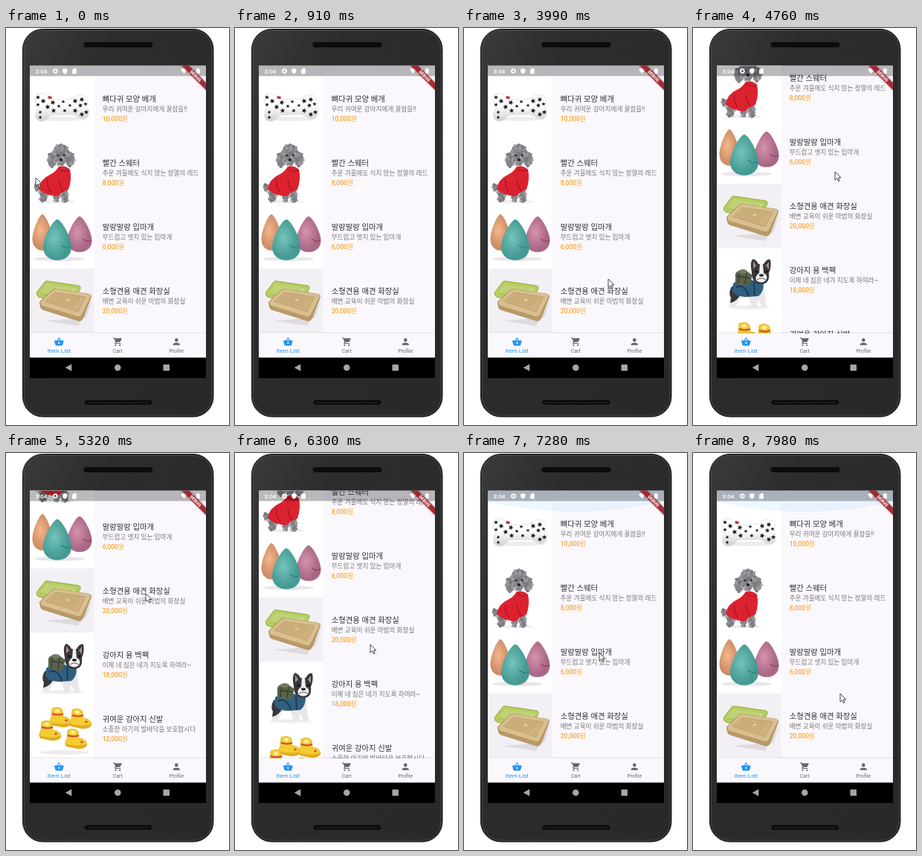
An HTML page for the animation above (8 s loop, 300x533 px).

```html
<!DOCTYPE html>
<html lang="ko">
<head>
<meta charset="utf-8">
<title>Item list</title>
<style>
  html, body { margin: 0; width: 100%; height: 100%; overflow: hidden; background: #fff; }
  svg { display: block; width: 300px; height: 533px; }
  text { font-family: Roboto, "Noto Sans CJK KR", "Noto Sans CJK", sans-serif; }
  .title { font-size: 10.4px; fill: #303032; }
  .note { font-size: 8.65px; fill: #78777b; }
  .price { font-size: 8.65px; fill: #f7a52d; font-weight: 500; }
  .tab { font-size: 6.9px; fill: #6b6a6d; text-anchor: middle; }
  .tab.on { font-size: 8.07px; fill: #2196f3; }
</style>
</head>
<body>
<svg viewBox="0 0 300 533" xmlns="http://www.w3.org/2000/svg">
  <defs>
    <clipPath id="screen"><rect x="32" y="50.500" width="237" height="419.500"/></clipPath>
    <clipPath id="view"><rect x="32" y="50.500" width="237" height="359.500"/></clipPath>
    <clipPath id="tile"><rect width="86.500" height="86"/></clipPath>
    <linearGradient id="body" x2="1" y2="1">
      <stop stop-color="#3b3b3c"/><stop offset=".25" stop-color="#2c2c2d"/><stop offset="1" stop-color="#292929"/>
    </linearGradient>
    <linearGradient id="cloth" x2="0" y2="1"><stop offset=".45" stop-color="#fff"/><stop offset="1" stop-color="#cfcdd0"/></linearGradient>
    <radialGradient id="shade" cx=".4" cy=".45"><stop stop-color="#fff" stop-opacity=".22"/><stop offset="1" stop-color="#203040" stop-opacity=".2"/></radialGradient>
    <filter id="soft" x="-50%" y="-50%" width="200%" height="200%"><feGaussianBlur stdDeviation="1.500"/></filter>
  </defs>

  <!-- phone -->
  <rect x="22.500" y="1.500" width="256.500" height="520.500" rx="27" fill="url(#body)" stroke="#161616"/>
  <rect x="24.500" y="3.500" width="252.500" height="516.500" rx="25" fill="none" stroke="#4a4a4b" stroke-width=".8"/>
  <rect x="104" y="18.500" width="94" height="8" rx="4" fill="#0c0c0c" stroke="#3a3a3a" stroke-width=".6"/>
  <rect x="105" y="499" width="92" height="7.500" rx="3.700" fill="#0c0c0c" stroke="#383838" stroke-width=".6"/>
  <path d="M110 503H192" stroke="#242424" stroke-width="2" stroke-dasharray="2 1.500"/>

  <g clip-path="url(#screen)">
    <rect x="32" y="50" width="237" height="392.500" fill="#fbf8fd"/>
    <g clip-path="url(#view)">
      <g id="list"></g>
      <path id="glow" d="M32 50V65Q150 93 269 65V50Z" fill="#2196f3" opacity="0"/>
    </g>

    <!-- status bar -->
    <rect x="32" y="50.500" width="237" height="14" fill="#000" opacity=".27"/>
    <g fill="#fff">
      <text x="39.500" y="60.800" font-size="8" font-weight="500">3:04</text>
      <circle cx="66.500" cy="57.800" r="2.300" fill="none" stroke="#fff" stroke-width="1.500"/>
      <circle cx="66.500" cy="57.800" r="3.300" fill="none" stroke="#fff" stroke-width="1" stroke-dasharray="1.300 1.290"/>
      <path d="M79.300 54l3.100 1.300v2.300q0 2.900-3.100 4.100q-3.100-1.200-3.100-4.100v-2.300z"/>
      <path d="M91.200 54.200h3.600v7.200h-5.800v-5zM235 55.600q4.500-3.600 9 0l-4.500 5.700zM252 54v7.500h-7.500zM257.300 54h2v.9h1.400v6.700h-4.800v-6.700h1.400z"/>
    </g>

    <g transform="translate(269 50.500) rotate(45)">
      <rect x="-23.100" y="16.200" width="46.200" height="6.900" opacity=".4" filter="url(#soft)"/>
      <rect x="-23.100" y="16.200" width="46.200" height="6.900" fill="#a9202c" opacity=".9"/>
      <text y="21.700" font-size="5.900" font-weight="900" fill="#fff" text-anchor="middle">DEBUG</text>
    </g>

    <!-- tabs -->
    <rect x="32" y="409" width="237" height="2" opacity=".13" filter="url(#soft)"/>
    <rect x="32" y="410" width="237" height="33" fill="#fbf8fd"/>
    <g id="tabs"></g>

    <!-- system keys -->
    <rect x="32" y="442.500" width="237" height="28"/>
    <g fill="#a6a6a6">
      <path d="M88.300 451.300v9.400l-8.600-4.700z"/><circle cx="150.300" cy="456" r="4.300"/>
      <rect x="211.500" y="451.800" width="8.500" height="8.500" rx=".8"/>
    </g>
  </g>

  <path id="cursor" d="M0 0V11.200L2.700 8.700L4.500 12.700L6.200 11.900L4.500 8H8Z" fill="#fff" stroke="#333" stroke-width=".9" stroke-linejoin="round"/>
</svg>

<script>
const $ = id => document.getElementById(id);
const path = (d, fill, more = '') => `<path d="${d}" fill="${fill}" ${more}/>`;
const oval = (x, y, rx, ry, fill) => `<ellipse cx="${x}" cy="${y}" rx="${rx}" ry="${ry}" fill="${fill}"/>`;
const times = (n, f) => Array.from({ length: n }, (_, i) => f(i)).join('');
const noise = i => { const v = Math.sin(i * 91.7 + 3) * 4375.5; return v - Math.floor(v); };

function star(x, y, r, turn) {
  const pts = times(10, i => {
    const a = turn + i * Math.PI / 5, q = i % 2 ? r * .45 : r;
    return `${(x + q * Math.sin(a)).toFixed(1)},${(y - q * Math.cos(a)).toFixed(1)} `;
  });
  return `<polygon points="${pts}" fill="#1c1b1f"/>`;
}

// curly fur: small blobs scattered inside an oval
const fur = (x, y, rx, ry, n, seed) => oval(x, y, rx, ry, '#85858a') + times(n, i => {
  const a = i * 2.4, d = Math.sqrt((i + .5) / n);
  const tone = ['#77777c', '#939398', '#a3a3a8', '#85858a'][Math.floor(noise(i + seed) * 4)];
  return oval(x + rx * d * Math.cos(a), y + ry * d * Math.sin(a), 2, 1.8, tone);
});

function pillow() {
  const spots = [[11, 28], [18, 33], [11, 38], [14, 48], [14, 55], [24, 41], [31, 35], [32, 46], [39, 40],
    [45, 34], [47, 46], [54, 39], [61, 33], [61, 46], [68, 39], [70, 31], [75, 37], [70, 51], [76, 48]];
  return oval(43, 57, 34, 3, '#eeecef') +
    path('M8 33Q5 24 13 23Q21 22 25 29Q43 34 59 29Q64 23 71 25Q79 27 78 35Q77 39 76 40Q82 47 78 54Q72 60 64 54Q60 51 56 51Q41 51 28 52Q22 61 14 60Q6 58 8 49Q9 45 11 42Q7 38 8 33Z',
      'url(#cloth)', 'stroke="#d9d7da" stroke-width=".7"') +
    spots.map(([x, y], i) => star(x, y, 2.5 + noise(i) * 1.2, i * .7)).join('') +
    path('M25 26l5 1.500l-1 3l-4.500-1z', '#b4323c');
}

function poodle() {
  return oval(36, 82, 25, 2.5, '#efedef') +
    fur(10, 63, 3.5, 4.5, 8, 1) + fur(19, 69, 6, 9, 18, 2) + fur(18, 79, 5, 3, 8, 3) +
    fur(36, 74, 4, 9, 16, 4) + fur(47, 74, 4.5, 10, 18, 5) +
    path('M39 35Q48 33 54 39Q57 52 52 66L43 70Q38 77 30 74Q18 72 12 65Q14 52 27 46Q34 43 39 35Z', '#dc2230') +
    path('M39 38Q47 43 54 40M39 52Q40 62 45 68M24 52Q22 62 29 70', 'none', 'stroke="#a91422" stroke-width="1.300"') +
    fur(30, 26, 6, 10, 22, 6) + fur(54, 25, 6, 10, 22, 7) + fur(42, 16, 10.5, 11, 42, 8) + fur(42, 27, 6, 7, 16, 9) +
    oval(38, 20, 1.4, 1.3, '#202024') + oval(46, 20, 1.4, 1.3, '#202024') + oval(42, 26, 2.3, 1.7, '#202024');
}

function drop(x, top, w, h, color, mark) {
  const d = `M${x} ${top}C${x + w * .13} ${top} ${x + w * .5} ${top + h * .42} ${x + w * .5} ${top + h * .68}` +
    `C${x + w * .5} ${top + h * 1.1} ${x - w * .5} ${top + h * 1.1} ${x - w * .5} ${top + h * .68}` +
    `C${x - w * .5} ${top + h * .42} ${x - w * .13} ${top} ${x} ${top}Z`;
  return path(d, color) + path(d, 'url(#shade)') +
    path(`M${x + w * .13} ${top + h * .63}q${w * .25} ${h * .12} ${w * .35} ${h * .02}`, 'none', `stroke="${mark}" stroke-width="1.200"`);
}

const pouches = () => oval(40, 73, 34, 3, '#e8e6e9') +
  drop(17, 13, 27, 49, '#f5a36d', '#bb6b42') + drop(67, 16, 33, 48, '#cb7597', '#873e60') +
  drop(37, 20, 38, 55, '#4eb5a8', '#277f78');

function trays() {
  const grid = (x, y, color) => times(7, i =>
    path(`M${x + i * 5.2} ${y + i * .9}l-13 14M${x - i * 1.900} ${y + i * 2}l32 6`, 'none', `stroke="${color}" stroke-width=".5"`));
  return '<rect width="87" height="86" fill="#f2f0f4"/>' +
    path('M20 70L65 77L84 42L76 66Z', '#dedbe0') +
    path('M10 31L20 18Q22 16 25 17L66 23Q69 24 68 27L58 46Q56 49 52 48L12 38Q8 36 10 31Z', '#b7cd62', 'stroke="#8faa3d"') +
    path('M15 32L24 21L62 27L54 42Z', '#cbdb86') + grid(26, 22, '#9fb654') +
    path('M14 49Q12 45 15 43L30 29Q32 27 36 28L79 34Q84 35 82 40L72 66Q70 71 65 70L17 55Q14 53 14 49Z', '#b99a67', 'stroke="#a18552" stroke-width=".6"') +
    path('M15 44L31 29Q33 28 36 28L79 34Q83 35 81 39L70 61Q68 65 64 64L18 50Q13 48 15 44Z', '#d9bf90') +
    path('M21 44L34 32L75 38L65 58Z', '#ceb17f', 'stroke="#b69865" stroke-width=".7"') + grid(37, 33, '#bea26f') +
    oval(51, 42, 2.5, 1.5, '#e1cba3');
}

function bulldog() {
  return oval(43, 80, 28, 2.5, '#eeecef') +
    path('M20 52Q14 63 19 68L17 79H25L32 67L43 67L47 80H54L55 70L61 79H67L63 51L47 39Z', '#e9e7e9') +
    path('M20 52Q15 61 19 67L18 74Q28 72 32 62L35 50Z', '#37373b') +
    path('M22 48Q32 40 46 43L63 48Q63 60 56 65L42 66Q25 66 21 58Z', '#315f7f') +
    path('M26 53Q38 48 43 65M50 46L51 65', 'none', 'stroke="#193b55" stroke-width="2"') +
    path('M25 35Q29 28 40 31L48 37L44 50Q33 53 25 47Z', '#59634b') +
    path('M27 38L45 41M31 32L29 48M40 34L38 49', 'none', 'stroke="#343d2e" stroke-width="1.400"') +
    oval(35, 32, 6, 3, '#717b60') +
    path('M47 33Q44 18 49 15Q54 17 56 22H63Q68 14 72 16Q74 25 70 34Q72 48 60 49Q47 48 47 33Z', '#38373b') +
    path('M58 22H62L63 34Q70 37 66 44Q60 49 53 44Q51 38 57 34Z', '#f2eff0') +
    path('M49 18L53 24L49 28ZM70 19L66 24L70 29Z', '#b58d89') +
    oval(53, 32, 1.7, 1.8, '#111') + oval(67, 32, 1.7, 1.8, '#111') + oval(60, 37, 3, 1.8, '#222') +
    path('M54 43Q60 39 66 43', 'none', 'stroke="#605a5d"');
}

function shoes() {
  const shoe = (x, y) => `<g transform="translate(${x} ${y})">` +
    path('M7 2Q16-2 21 4L22 13Q33 14 33 22Q30 27 19 26L5 23Q2 19 6 14Z', '#f3cc31', 'stroke="#d8a71e" stroke-width=".7"') +
    path('M4 20Q17 25 33 21Q32 28 19 27L5 24Z', '#e2ad20') +
    path('M7 9Q15 12 22 9', 'none', 'stroke="#cf4938" stroke-width="2"') +
    oval(14, 5, 3, 2.2, '#fff0a0') + oval(26, 18, 2, 1.5, '#d95642') + '</g>';
  return oval(47, 75, 33, 3, '#eeecef') + shoe(23, 14) + shoe(50, 16) + shoe(9, 32) + shoe(44, 43);
}

const items = [
  [pillow, '뼈다귀 모양 베개', '우리 귀여운 강아지에게 꿀잠을!!', '10,000원'],
  [poodle, '빨간 스웨터', '추운 겨울에도 식지 않는 정열의 레드', '8,000원'],
  [pouches, '말랑말랑 입마개', '부드럽고 엣지 있는 입마개', '6,000원'],
  [trays, '소형견용 애견 화장실', '배변 교육이 쉬운 마법의 화장실', '20,000원'],
  [bulldog, '강아지 용 백팩', '이제 네 짐은 네가 지도록 하여라~', '18,000원'],
  [shoes, '귀여운 강아지 신발', '소중한 아기의 발바닥을 보호합시다', '12,000원']
];
$('list').innerHTML = items.map(([art, title, note, price], i) => `
  <g transform="translate(32 ${65 + i * 86})">
    <g clip-path="url(#tile)"><rect width="87" height="86" fill="#fff"/>${art()}</g>
    <text class="title" x="97.700" y="34">${title}</text>
    <text class="note" x="97.700" y="46.700">${note}</text>
    <text class="price" x="97.700" y="59.800">${price}</text>
  </g>`).join('');

const tabs = [
  ['Item List', 'M17.2 9L12.830 2.440a1 1 0 0 0-1.660 0L6.800 9H2a1 1 0 0 0-1 1.300l2.600 9.200A2 2 0 0 0 5.500 21h13a2 2 0 0 0 1.900-1.500l2.600-9.200A1 1 0 0 0 22 9zM9 9l3-4.400L15 9zM12 17a2 2 0 1 1 0-4a2 2 0 0 1 0 4z'],
  ['Cart', 'M7 18a2 2 0 1 0 0 4a2 2 0 0 0 0-4zM1 2v2h2l3.600 7.600-1.400 2.400A2 2 0 0 0 7 17h12v-2H7.400l1.100-2H16a2 2 0 0 0 1.700-1l3.600-6.500A1 1 0 0 0 20.400 4H5.200L4.300 2zM17 18a2 2 0 1 0 0 4a2 2 0 0 0 0-4z'],
  ['Profile', 'M12 4a4 4 0 1 0 0 8a4 4 0 0 0 0-8zM4 20v-2c0-2.700 5.300-4 8-4s8 1.300 8 4v2z']
];
$('tabs').innerHTML = tabs.map(([label, d], i) => {
  const x = 71.300 + i * 79, color = i ? '#666568' : '#2196f3';
  return `<g transform="translate(${x - 6.9} 414.300) scale(.577)">${path(d, color, 'fill-rule="evenodd"')}</g>
    <text class="tab ${i ? '' : 'on'}" x="${x}" y="435.700">${label}</text>`;
}).join('');

// tracks: [time, value, ...]
const scroll = [[4340, 0], [4480, 30], [4620, 76], [4760, 114], [4900, 137], [5110, 157], [5320, 168], [5530, 171],
  [6020, 171], [6160, 160], [6300, 129], [6440, 95], [6580, 65], [6720, 40], [6860, 16], [7000, 0]];
const glow = [[6930, 0], [7070, .12], [7700, 0], [7770, .02], [7980, .08]];
const pointer = [[0, 40, 201], [3010, 252, 300], [3430, 205, 330], [3780, 194, 337], [4340, 194, 337], [4480, 194, 300],
  [4620, 193, 245], [4760, 191, 193], [4900, 190, 172], [5110, 189, 172], [5530, 187, 205], [6020, 187, 205],
  [6300, 182, 257], [6440, 179, 277], [6720, 174, 286], [7280, 182, 268], [7700, 190, 272], [7980, 198, 323]];

function at(track, t, k = 1) {
  const i = track.findIndex(p => p[0] > t);
  if (i === 0) return track[0][k];
  if (i < 0) return track[track.length - 1][k];
  const a = track[i - 1], b = track[i];
  return a[k] + (b[k] - a[k]) * (t - a[0]) / (b[0] - a[0]);
}

const LOOP = 8000, STEP = 70;
function draw() {
  const now = performance.now() % LOOP;
  const t = Math.floor(now / STEP) * STEP;
  const cursorTime = t < 3010 ? 0 : t;
  $('list').setAttribute('transform', `translate(0 ${-at(scroll, t)})`);
  $('glow').setAttribute('opacity', at(glow, t));
  $('cursor').setAttribute('transform', `translate(${at(pointer, cursorTime)} ${at(pointer, cursorTime, 2)})`);
  $('cursor').setAttribute('visibility', t < STEP || t >= 3010 ? 'visible' : 'hidden');
  requestAnimationFrame(draw);
}
draw();
</script>
</body>
</html>
```
